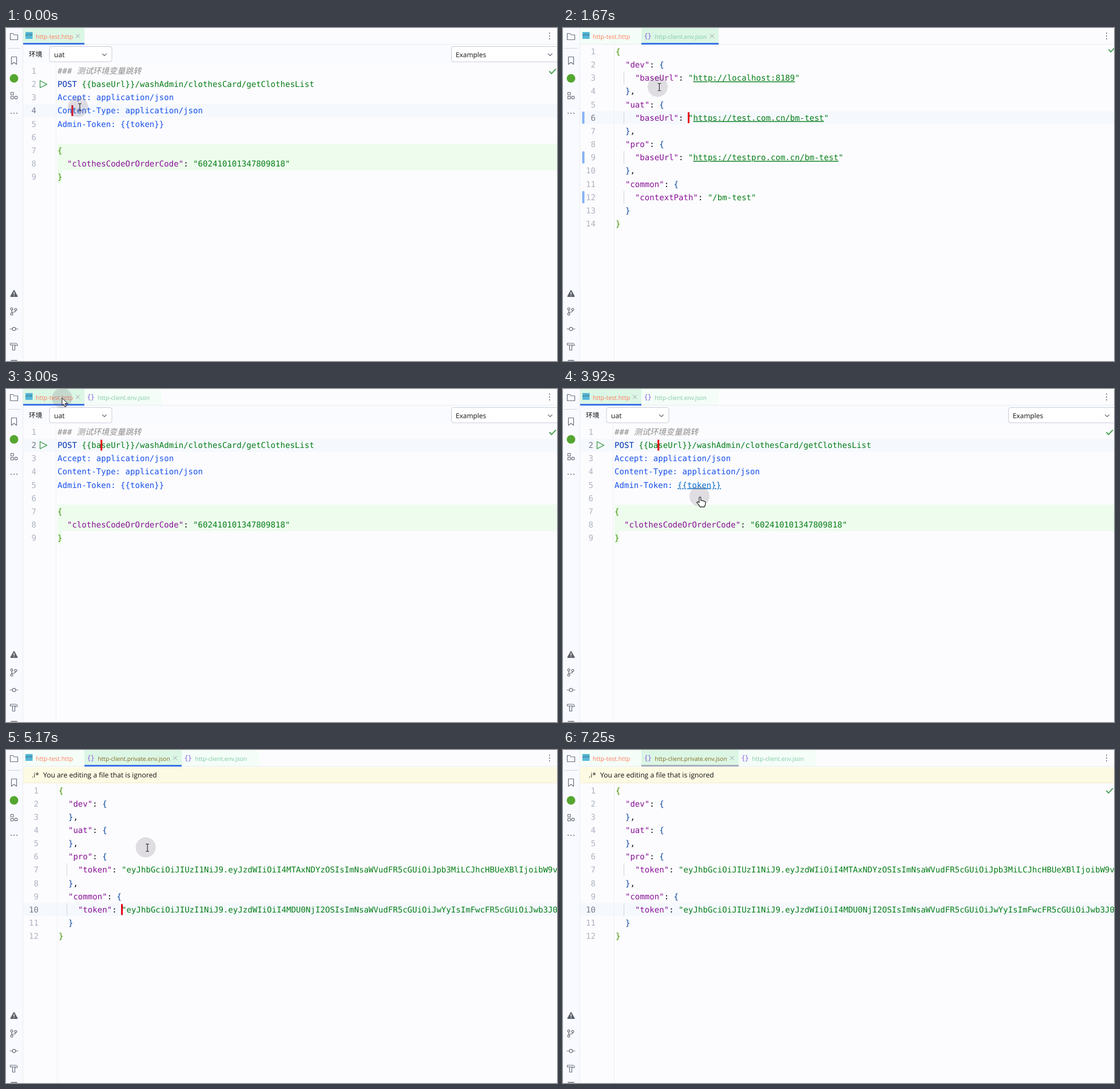
Recreate the animation shown at these times as an HTML page. Size 963 px wide and 582 px high, loop 7.41 s.

```html
<!DOCTYPE html>
<html lang="zh">
<head>
<meta charset="utf-8">
<style>
html, body { margin: 0; width: 100%; height: 100%; overflow: hidden; background: #fcfcfe; }
svg { display: block; }
text { white-space: pre; text-rendering: geometricPrecision; }
.code { font: 14.07px "DejaVu Sans Mono", "Noto Sans CJK SC", "Noto Sans CJK", monospace; }
.ui { font: 12.1px "Open Sans", "Noto Sans CJK SC", "Noto Sans CJK", sans-serif; }
</style>
</head>
<body>
<svg id="stage" width="963" height="582" viewBox="0 0 963 582"></svg>
<script>
const LOOP = 7410, TICK = 1000 / 12, CH = 8.47, LH = 23.15;
const GREEN = '#067d17', BLUE = '#1750eb', LINK = '#0a6cc8', PURPLE = '#871094';

const rect = (x, y, w, h, fill, more = '') =>
  `<rect x="${x}" y="${y}" width="${w}" height="${h}" fill="${fill}" ${more}/>`;
const line = (d, color, width = 1, fill = 'none') =>
  `<path d="${d}" stroke="${color}" stroke-width="${width}" fill="${fill}" stroke-linecap="round" stroke-linejoin="round"/>`;
const dot = (x, y, r, fill, more = '') => `<circle cx="${x}" cy="${y}" r="${r}" fill="${fill}" ${more}/>`;
const label = (x, y, s, color, size = 12.1, more = '') =>
  `<text class="ui" x="${x}" y="${y}" fill="${color}" style="font-size:${size}px" ${more}>${s}</text>`;
const span = (color, s, under) =>
  `<tspan fill="${color}"${under ? ' text-decoration="underline"' : ''}>${s}</tspan>`;

// Syntax colours for one line of JSON
function json(s) {
  const brace = /^\s/.test(s) ? '#0e4a9e' : '#3f9101';
  return s.replace(/("[^"]*")(:?)|[{}]/g, (m, str, colon) => {
    if (!str) return span(brace, m);
    if (colon) return span(PURPLE, str) + ':';
    const url = str.slice(1, -1);
    return /^http/.test(url) ? span(GREEN, '"') + span(GREEN, url, true) + span(GREEN, '"') : span(GREEN, str);
  });
}

const httpLines = hover => [
  '<tspan fill="#8c8c8c" font-style="italic">### 测试环境变量跳转</tspan>',
  span('#0033b3', 'POST ') + span(hover == 'url' ? LINK : GREEN, '{{baseUrl}}', hover == 'url') +
    span(GREEN, '/washAdmin/clothesCard/getClothesList'),
  span(BLUE, 'Accept: application/json'),
  span(BLUE, 'Content-Type: application/json'),
  span(BLUE, 'Admin-Token: ') + span(hover == 'token' ? LINK : BLUE, '{{token}}', hover == 'token'),
  '',
  ...['{', '  "clothesCodeOrOrderCode": "602410101347809818"', '}'].map(json)
];

const envLines = `{
  "dev": {
    "baseUrl": "http://localhost:8189"
  },
  "uat": {
    "baseUrl": "https://test.com.cn/bm-test"
  },
  "pro": {
    "baseUrl": "https://testpro.com.cn/bm-test"
  },
  "common": {
    "contextPath": "/bm-test"
  }
}`.split('\n').map(json);

const privateLines = `{
  "dev": {
  },
  "uat": {
  },
  "pro": {
    "token": "eyJhbGciOiJIUzI1NiJ9.eyJzdWIiOiI4MTAxNDYzOSIsImNsaWVudFR5cGUiOiJpb3MiLCJhcHBUeXBlIjoibW9v"
  },
  "common": {
    "token": "eyJhbGciOiJIUzI1NiJ9.eyJzdWIiOiI4MDU0NjI2OSIsImNsaWVudFR5cGUiOiJwYyIsImFwcFR5cGUiOiJwb3J0"
  }
}`.split('\n').map(json);

// mid is the centre of the first line; row and col place the caret
function editor(lines, { x, mid, numX, row, col, caret }) {
  const cy = mid + (row - 1) * LH;
  let s = rect(30, cy - 11.6, 933, LH, '#f5f9fe');
  s += line(`M${x - 2.5} ${mid - 12}V582`, '#eeeff3');
  lines.forEach((text, i) => {
    const y = mid + i * LH;
    if (/^    /.test(text)) s += line(`M${x + 14.5} ${y - 11}V${y + 11}`, '#d0d4dc');
    s += `<text class="code" x="${numX}" y="${y + 5}" text-anchor="end" fill="${i + 1 == row ? '#767a8a' : '#aeb3c2'}">${i + 1}</text>` +
      `<text class="code" x="${x}" y="${y + 5}" fill="#080808">${text}</text>`;
  });
  if (caret) s += rect(x + col * CH - 1, cy - 9.5, 3, 19, '#e60012');
  return s;
}

const check = (x, y) => line(`M${x} ${y}l3.5 3.7l7 -7.7`, '#4fa65c', 2);
const chevron = (x, y) => line(`M${x - 3.5} ${y - 2}l3.5 3.5l3.5 -3.5`, '#6c707e', 1.1);

function tab(x, w, name, color, active, bar = '#3b72e8') {
  const isHttp = name == 'http-test.http';
  let s = rect(x, 0, w, 28, active ? '#dcf6e5' : '#f4fdf7');
  s += isHttp
    ? rect(34, 7, 12.5, 12, '#58b9d8') + label(34, 13.5, 'HTTP', '#23485c', 5, 'font-weight="700"')
    : `<text class="code" x="${x + 4.5}" y="18" fill="#8a63dc" style="font-size:12px;letter-spacing:-1px">{}</text>`;
  s += label(isHttp ? 52 : x + 23.5, 18.5, name, color, isHttp ? 10.5 : 10.2);
  if (active) s += line(`M${x + w - 14.5} 11l6 6m0 -6l-6 6`, '#9aa0ad') + rect(x, 26, w, 3, bar);
  return s;
}
const httpTab = active => tab(30, 107, 'http-test.http', '#ff7a5c', active);
const envTab = (x, active) => tab(x, 135, 'http-client.env.json', '#7fc8a6', active);

function sidebar() {
  const c = '#6c707e';
  return rect(0, 0, 29, 582, '#f8faff') + line('M29.5 0V582', '#ebecf0') +
    line('M7.5 9.5h4.5l2 2.5h6.5v8.5h-13z', c, 1.2) + line('M3 35.5H25', '#d3d5db') +
    line('M9.5 50.5h9v13l-4.5 -3.5l-4.5 3.5z', c, 1.2) +
    dot(14, 88, 7.5, '#55a630') +
    line('M8.5 112.5h4.5v4.5h-4.5zM8.5 119.5h4.5v4.5h-4.5z', c, 1.2) +
    dot(17.5, 121.5, 2.4, 'none', `stroke="${c}" stroke-width="1.2"`) +
    [9, 14, 19].map(x => dot(x, 149, 1, c)).join('') +
    line('M14 459l5.5 10h-11z', '#5d616b', 2, '#5d616b') + line('M14 462v3.5m0 2.2v.2', '#fff', 1.3) +
    [[10, 491], [17, 492], [10, 500]].map(p => dot(...p, 1.9, 'none', `stroke="${c}" stroke-width="1.2"`)).join('') +
    line('M10 493V498M17 494Q17 497 10 497', c, 1.2) +
    dot(14, 526, 2.8, 'none', `stroke="${c}" stroke-width="1.2"`) + line('M7 526h4m6 0h4', c, 1.2) +
    line('M7.5 551h9.5q3 .5 3 4h-3.5v-1h-9zM11.5 554.5v8.5h4v-8.5', c, 1.2) +
    line('M9 581h10', c, 1.5);
}

function httpView(opts, hover) {
  return rect(30, 29, 933, 33, '#f9fbff') +
    label(40, 49.5, '环境', '#111', 11.8, 'font-weight="500"') +
    rect(76, 32.5, 109, 26.5, '#fff', 'rx="3.5" stroke="#c9ccd6"') + label(84, 51, 'uat', '#111') + chevron(172, 47) +
    rect(778.5, 32.5, 200, 26.5, '#fff', 'rx="3.5" stroke="#c9ccd6"') + label(786, 51, 'Examples', '#111', 11.9) + chevron(951, 47) +
    rect(90, 202.3, 873, 46, '#edfced') + rect(90, 248, 8, 23, '#edfced') +
    editor(httpLines(hover), { x: 90, mid: 75, numX: 53, ...opts }) +
    line('M59.5 92v12.5l12 -6.2z', '#3f9a53', 1.3, '#f2fcf3') + check(950, 76);
}

// Pointer stops: time, x, y
const track = [
  [0, 126, 138], [833, 165, 102], [2000, 165.5, 103], [2750, 98, 16], [3083, 98, 16],
  [3833, 238, 189], [4333, 244, 170], [6250, 244.5, 170.5], [6667, 914, 640]
];

function pointer(t, hover) {
  const i = track.findIndex(p => p[0] > t);
  if (i < 1) return '';
  const [t0, x0, y0] = track[i - 1], [t1, x1, y1] = track[i];
  const u = (t - t0) / (t1 - t0), k = u * u * (3 - 2 * u);
  const x = x0 + (x1 - x0) * k, y = y0 + (y1 - y0) * k;
  let shape;
  if (hover) shape = line('M-.5 2.2Q1 0 2.5 2.2V7.5Q4 6.2 5.3 8Q6.8 7 8 8.8Q10.2 8 10.5 10.5V13Q10.2 16 8.5 18.5H1Q-1 14 -4.5 11Q-4.5 8.8 -2 9.8L-.5 11Z', '#111', 1.1, '#fff');
  else if (y < 29) shape = line('M0 0V13L3 10.3L5 15L7.2 14L5.2 9.5H9.5Z', '#111', 1, '#fff');
  else shape = line('M.5 -6q2 0 2.5 .8q.5 -.8 2.5 -.8M3 -5V6M.5 7q2 0 2.5 -.8q.5 .8 2.5 .8', '#222', 1.1);
  return `<g transform="translate(${x} ${y})">${dot(0, 0, 17.6, 'rgba(105,95,115,.2)')}${shape}</g>`;
}

function scene(t) {
  const within = (a, b) => t >= a - 5 && t < b - 5;
  const hover = within(583, 1583) ? 'url' : within(3917, 5083) ? 'token' : '';
  let s = rect(0, 0, 963, 582, '#fcfcfe') + line('M30 28.5H963', '#ebecf0');

  if (within(0, 1583)) {
    const clicked = t >= 1245;
    s += httpTab(true) + httpView(clicked
      ? { row: 2, col: 9, caret: true }
      : { row: 4, col: 3, caret: !within(250, 750) }, hover);
  } else if (within(1583, 3000)) {
    s += httpTab(false) + envTab(137, true);
    s += editor(envLines, { x: 92, mid: 41, numX: 57, row: 6, col: 15, caret: !within(2083, 2583) });
    for (const n of [6, 9, 12]) s += rect(33.5, 41 + (n - 1) * LH - 10.5, 4, 21, '#87b0f5', 'rx="1"');
    s += check(within(1583, 1750) ? 954 : 950, 38);
  } else if (within(3000, 5083)) {
    const clicked = t >= 4995;
    s += httpTab(true) + envTab(137, false) + httpView(clicked
      ? { row: 5, col: 18, caret: true }
      : { row: 2, col: 9, caret: !within(3333, 3833) && !within(4333, 5000) }, hover);
  } else {
    const bar = t >= 7161 ? '#a8adbd' : undefined;
    s += httpTab(false) + tab(137, 170, 'http-client.private.env.json', '#85681f', true, bar) + envTab(307, false);
    s += rect(30, 30, 933, 27.5, '#fdfae3') + line('M30 57.5H963', '#f3edcf');
    s += label(45, 48, '.i*', '#222', 12, 'font-weight="700" font-style="italic"') +
      label(65, 48, 'You are editing a file that is ignored', '#111', 12.13);
    s += editor(privateLines, { x: 92, mid: 70.5, numX: 57, row: 10, col: 13,
      caret: within(5083, 6167) || within(6667, 7167) });
    if (t >= 5578) s += check(950, 71.5);
  }
  s += [9, 14, 19].map(y => dot(950, y, 1.1, '#6c707e')).join('');
  return s + sidebar() + pointer(t, hover);
}

const stage = document.getElementById('stage');
const start = performance.now();
let last = -1;
function frame() {
  const t = (performance.now() - start) % LOOP;
  const tick = Math.floor((t + 4) / TICK);
  if (tick != last) stage.innerHTML = scene((last = tick) * TICK);
  requestAnimationFrame(frame);
}
frame();
</script>
</body>
</html>
```
